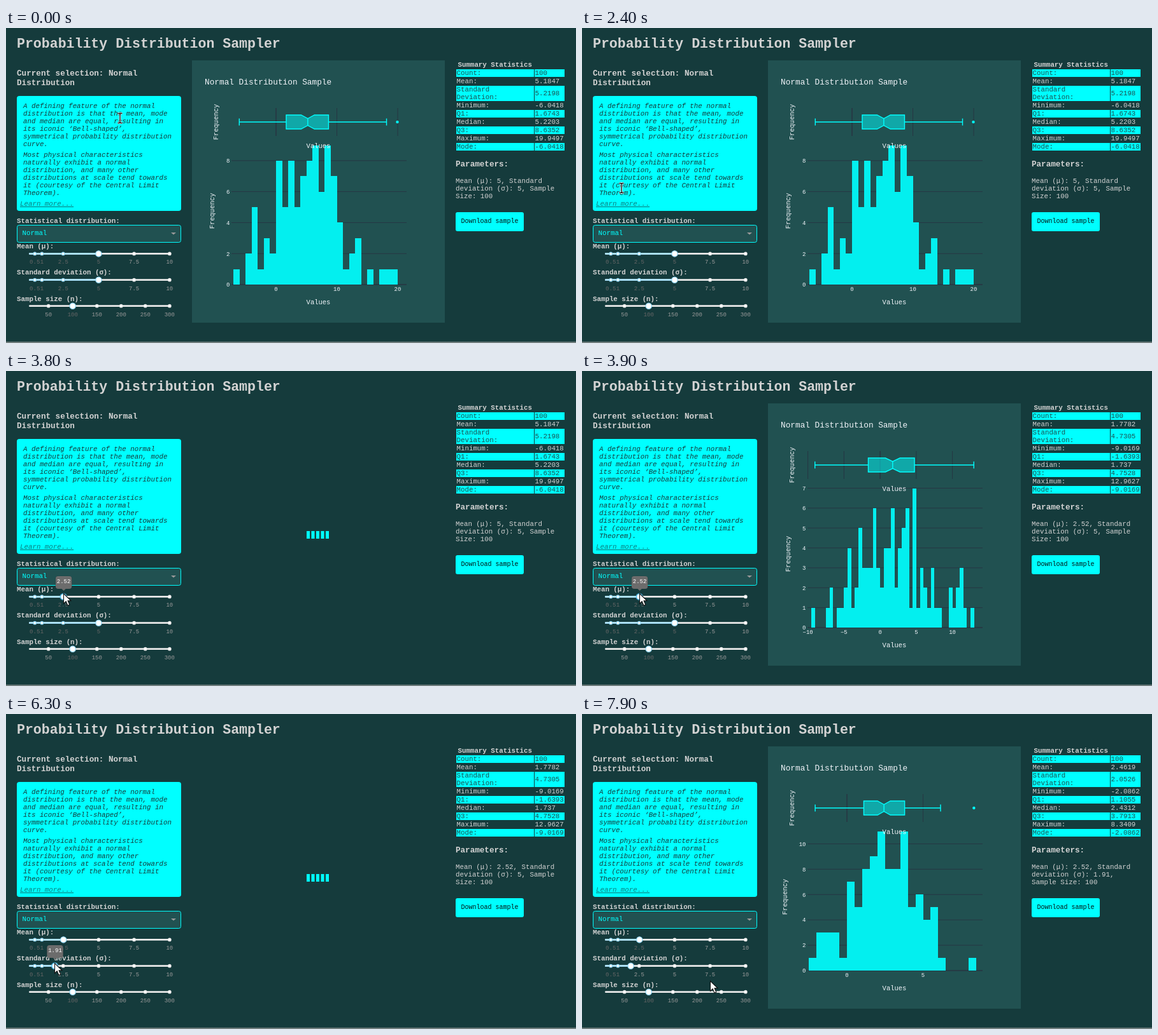
Animation, 895 px wide and 496 px high, one loop 8 s. Source, as an HTML page:

```html
<!DOCTYPE html>
<html lang="en">
<head>
<meta charset="utf-8">
<title>Probability Distribution Sampler</title>
<style>
  html, body { margin: 0; width: 100%; height: 100%; overflow: hidden; background: #153b3c; }
  svg { display: block; width: 895px; height: 496px; }
  text { font-family: "Liberation Mono", "Courier New", monospace; white-space: pre; }
</style>
</head>
<body>
<svg id="stage" viewBox="0 0 895 496" xmlns="http://www.w3.org/2000/svg">
  <defs>
    <linearGradient id="edge" x2="0" y2="1">
      <stop offset="0" stop-color="#3c5657"/>
      <stop offset=".6" stop-color="#7d8888"/>
      <stop offset="1" stop-color="#6a7677"/>
    </linearGradient>
  </defs>
  <g id="page"></g>
  <g id="results"></g>
  <g id="sliders"></g>
  <g id="tip"></g>
  <g id="pointer"></g>
</svg>
<script>
const LOOP = 8000;
const CYAN = '#00ffff', PAGE = '#153b3c', PANEL = '#215151', GREY = '#d3d3d3';
const INK = '#1b5253', BAR = '#03efef', GRID = '#283442', PALE = '#f2f5fa';
const BASE = 10.79;
const el = id => document.getElementById(id);

// Markup helpers
const text = (x, y, str, size, fill, extra = '') =>
  `<text x="${x}" y="${y}" font-size="${size}" fill="${fill}" ${extra}>${str}</text>`;
const rect = (x, y, w, h, fill, extra = '') =>
  `<rect x="${x}" y="${y}" width="${w}" height="${h}" fill="${fill}" ${extra}/>`;
const path = (d, stroke, width = 1, fill = 'none') =>
  `<path d="${d}" stroke="${stroke}" stroke-width="${width}" fill="${fill}"/>`;
const circle = (x, y, r, fill, extra = '') =>
  `<circle cx="${x}" cy="${y}" r="${r}" fill="${fill}" ${extra}/>`;
const lines = (x, y, list, step, ...style) =>
  list.map((s, i) => text(x, y + i * step, s, ...style)).join('');
const BOLD = 'font-weight="bold"', ITALIC = 'font-style="italic"';
const MIDDLE = 'text-anchor="middle"', END = 'text-anchor="end"';

const samples = [
  {
    mean: 5, sd: 5, zero: 424, unit: 9.55, start: -7, bin: 1, xTicks: [0, 10, 20], yStep: 2, labelX: 327,
    counts: [1, 0, 2, 5, 1, 3, 2, 8, 5, 8, 5, 7, 8, 9, 6, 9, 7, 4, 1, 2, 3, 0, 1, 0, 1, 1, 1],
    stats: ['5.1847', '5.2198', '-6.0418', '1.6743', '5.2203', '8.6352', '19.9497', '-6.0418'],
    whisker: 18.17,
    params: ['Mean (μ): 5, Standard', 'deviation (σ): 5, Sample', 'Size: 100']
  },
  {
    mean: 2.52, sd: 5, zero: 468.1, unit: 11.35, start: -9.5, bin: .5, xTicks: [-10, -5, 0, 5, 10], yStep: 1, labelX: 327,
    counts: [1, 0, 0, 0, 1, 2, 0, 1, 1, 2, 4, 1, 2, 5, 3, 3, 3, 6, 3, 2, 4, 4, 6, 2, 4, 5, 6,
      1, 7, 1, 3, 2, 1, 3, 1, 1, 0, 0, 2, 1, 2, 3, 1, 0, 1],
    stats: ['1.7782', '4.7305', '-9.0169', '-1.6393', '1.737', '4.7528', '12.9627', '-9.0169'],
    params: ['Mean (μ): 2.52, Standard', 'deviation (σ): 5, Sample', 'Size: 100']
  },
  {
    mean: 2.52, sd: 1.91, zero: 416, unit: 23.9, start: -2.5, bin: .5, xTicks: [0, 5], yStep: 2, labelX: 322,
    counts: [1, 3, 3, 3, 1, 7, 5, 8, 9, 11, 8, 8, 11, 5, 6, 4, 5, 1, 0, 0, 0, 1],
    stats: ['2.4619', '2.0526', '-2.0862', '1.1055', '2.4312', '3.7913', '8.3409', '-2.0862'],
    whisker: 6.15,
    params: ['Mean (μ): 2.52, Standard', 'deviation (σ): 1.91,', 'Sample Size: 100']
  }
];

function pageMarkup() {
  const label = (y, str) => text(17, y, str, BASE, GREY, BOLD);
  return rect(0, 0, 895, 496, PAGE) +
    rect(0, 493.5, 895, 2.5, 'url(#edge)') +
    text(17, 31, 'Probability Distribution Sampler', 21.56, GREY, BOLD) +
    lines(17, 75, ['Current selection: Normal', 'Distribution'], 15, 12.63, GREY, BOLD) +
    rect(17, 107, 258, 181, CYAN, 'rx="4"') +
    lines(27, 126, ['A defining feature of the normal', 'distribution is that the mean, mode',
      'and median are equal, resulting in', 'its iconic ‘Bell-shaped’,',
      'symmetrical probability distribution', 'curve.'], 12, BASE, PAGE, ITALIC) +
    lines(27, 203, ['Most physical characteristics', 'naturally exhibit a normal',
      'distribution, and many other', 'distributions at scale tend towards',
      'it (courtesy of the Central Limit', 'Theorem).'], 12, BASE, PAGE, ITALIC) +
    text(22, 280, 'Learn more...', BASE, '#0b7f80', ITALIC + ' text-decoration="underline"') +
    label(307, 'Statistical distribution:') +
    rect(17.5, 310.5, 257, 27, PANEL, `rx="3" stroke="${CYAN}"`) +
    text(25.5, 326, 'Normal', BASE, CYAN) +
    '<path d="M259 322h8l-4 3.6z" fill="#999"/>' +
    label(347, 'Mean (μ):') + label(388, 'Standard deviation (σ):') + label(430, 'Sample size (n):') +
    text(709.5, 61, 'Summary Statistics', BASE, GREY, BOLD) +
    text(706, 218, 'Parameters:', 12.6, GREY, BOLD) +
    rect(706, 290, 107, 30, CYAN, 'rx="3"') +
    text(714.5, 307, 'Download sample', 10, '#041414');
}

function boxMarkup(s, px) {
  const [low, q1, med, q3, max] = [2, 3, 4, 5, 6].map(i => +s.stats[i]);
  const high = s.whisker ?? max, mid = 148;
  const notch = 1.57 * (q3 - q1) / 10;
  const [a, b, m, n, o] = [q1, q3, med, med - notch, med + notch].map(px);
  const [l, h] = [low, high].map(px);
  return path(`M${l} ${mid}H${a}M${b} ${mid}H${h}M${l} 142.5v11M${h} 142.5v11`, CYAN, 1.4) +
    path(`M${a} 137H${n}L${m} 142.5L${o} 137H${b}V159H${o}L${m} 153.5L${n} 159H${a}ZM${m} 142.5v11`,
      CYAN, 1.4, 'rgba(0,255,255,.5)') +
    (s.whisker ? circle(px(max), mid, 2.2, CYAN) : '');
}

function chartMarkup(s) {
  const peak = Math.max(...s.counts), rise = 219.5 / peak;
  const px = v => +(s.zero + v * s.unit).toFixed(2);
  const py = n => +(404 - n * rise).toFixed(2);
  const yTicks = [];
  for (let n = 0; n <= peak; n += s.yStep) yTicks.push(n);
  const side = (x, y) =>
    text(0, 0, 'Frequency', 10.45, PALE, `${MIDDLE} transform="translate(${x} ${y}) rotate(-90)"`);
  const bars = s.counts.map((n, i) => {
    const x = px(s.start + i * s.bin);
    return n ? `M${x} 404V${py(n)}h${s.unit * s.bin}V404z` : '';
  }).join('');
  return rect(292, 51, 397, 413, PANEL) +
    s.xTicks.map(v => path(`M${px(v)} 126V170`, GRID, v ? .9 : 1.5)).join('') +
    yTicks.map(n => path(`M354 ${py(n)}H629`, GRID, n ? .9 : 1.5)).join('') +
    `<path d="${bars}" fill="${BAR}" shape-rendering="crispEdges"/>` +
    boxMarkup(s, px) +
    s.xTicks.map(v => text(px(v), 414, String(v).replace('-', '−'), 9, PALE, MIDDLE)).join('') +
    yTicks.map(n => text(351.5, py(n) + 3.3, n, 9, PALE, END)).join('') +
    text(312, 89, 'Normal Distribution Sample', 12.77, PALE) +
    text(490.5, 189, 'Values', 10.5, PALE, MIDDLE) +
    text(490.5, 435, 'Values', 10.5, PALE, MIDDLE) +
    side(333, 148) + side(s.labelX, 288);
}

function statsMarkup(s) {
  const names = ['Count:', 'Mean:', 'Standard|Deviation:', 'Minimum:', 'Q1:', 'Median:', 'Q3:', 'Maximum:', 'Mode:'];
  let y = 65;
  const rows = ['100', ...s.stats].map((value, i) => {
    const parts = names[i].split('|'), h = 12 * parts.length, lit = i % 2 === 0;
    const fill = lit ? INK : GREY;
    const row = (lit ? rect(707, y, 122, h, CYAN) + rect(830, y, 47, h, CYAN) : '') +
      lines(707.5, y + 9, parts, 12, BASE, fill) +
      text(830.5, y + 3 + h / 2, value, BASE, fill);
    y += h + 1;
    return row;
  });
  return rows.join('') + lines(706, 244, s.params, 12, BASE, GREY);
}

const loader = [0, 1, 2, 3, 4].map(i => rect(472 + i * 7.5, 252, 5, 12, CYAN)).join('');

const linear = (min, max) => v => +(36.3 + (v - min) / (max - min) * 220.5).toFixed(2);
const scale = linear(.1, 10), sizeScale = linear(10, 300);
const marks = [.5, 1, 2.5, 5, 7.5, 10], sizeMarks = [50, 100, 150, 200, 250, 300];

function slider(y, value, ticks, px, filled, held) {
  const x = px(value), isOn = v => filled ? v <= value : v === value;
  return rect(36, y - 1.4, 221, 2.8, '#e9e9e9', 'rx="1.4"') +
    (filled ? rect(36, y - 1.4, x - 36, 2.8, '#abe2fb', 'rx="1.4"') : '') +
    ticks.map(v => circle(px(v), y, 2.3, '#fff', `stroke="${isOn(v) ? '#96dbfa' : '#e9e9e9'}" stroke-width="1.2"`) +
      text(px(v), y + 16, v, 9, isOn(v) ? '#666' : '#999', MIDDLE)).join('') +
    (held ? circle(x, y, 6, '#57c5f7', 'opacity=".35"') : '') +
    circle(x, y, 4.6, '#fff', `stroke="${held ? '#57c5f7' : '#96dbfa'}" stroke-width="1.3"`);
}

function tooltip(x, y, value) {
  return rect(x - 13.5, y - .5, 27, 21, '#000', 'rx="5" opacity=".15"') +
    rect(x - 12.7, y, 25.4, 20, '#6c6c6c', 'rx="4"') +
    `<path d="M${x - 3.2} ${y + 20}h6.4l-3.2 3z" fill="#6c6c6c"/>` +
    text(x, y + 11.4, value, 9, '#fff', MIDDLE);
}

const beam = 'M-3.5 -7.5H-1Q0 -7.5 0 -6.5Q0 -7.5 1 -7.5H3.5M0 -6.5V6.5M-3.5 7.5H-1Q0 7.5 0 6.5Q0 7.5 1 7.5H3.5';
const cursors = {
  beam: path(beam, '#fff', 3) + path(beam, '#000', 1.3),
  arrow: path('M.5 .5V16.2L4.2 12.8L7 19.2L9.8 18L7.1 11.8H12Z', '#111', 1.1, '#fff')
};

// Pointer steps: time, x, y
const moves = [
  [0, 179, 142], [300, 166, 146], [400, 130, 156], [500, 86, 163], [600, 57, 161], [700, 49, 156],
  [1100, 49, 160], [1200, 51, 173], [1300, 54, 192], [1400, 58, 212], [1500, 61, 229], [1600, 62, 239],
  [2400, 62, 252], [2800, 132, 337],
  [3100, 127, 340], [3200, 111, 346], [3300, 96, 350], [3400, 89, 350], [3700, 90, 350],
  [5400, 96, 358], [5500, 90, 373], [5600, 79, 387], [5700, 76, 392], [7000, 76, 391],
  [7500, 88, 396], [7600, 117, 407], [7700, 155, 416], [7800, 187, 420], [7900, 201, 420]
];

// Interface steps: time, sample shown, loading, mean, deviation, held slider
const states = [
  [0, 0, false, 5, 5, ''],
  [3700, 0, false, 2.52, 5, 'mean'],
  [3800, 0, true, 2.52, 5, 'mean'],
  [3900, 1, false, 2.52, 5, 'mean'],
  [5400, 1, false, 2.52, 5, ''],
  [6300, 1, true, 2.52, 1.91, 'sd'],
  [6400, 2, false, 2.52, 1.91, 'sd'],
  [7500, 2, false, 2.52, 1.91, '']
];

const at = (table, t) => table.findLast(row => row[0] <= t);
let lastState, lastMove;

function showState([, index, loading, mean, sd, held]) {
  const s = samples[index];
  el('results').innerHTML = (loading ? loader : chartMarkup(s)) + statsMarkup(s);
  el('sliders').innerHTML =
    slider(355.4, mean, marks, scale, true, held === 'mean') +
    slider(396.7, sd, marks, scale, true, held === 'sd') +
    slider(437.7, 100, sizeMarks, sizeScale, false, false);
  el('tip').innerHTML =
    held === 'mean' ? tooltip(scale(mean) + .4, 323, mean) :
    held === 'sd' ? tooltip(scale(sd) + .4, 364, sd) : '';
}

function showPointer([time, x, y]) {
  el('pointer').innerHTML = cursors[time < 2800 ? 'beam' : 'arrow'];
  el('pointer').setAttribute('transform', `translate(${x} ${y})`);
}

function draw(now) {
  const t = Math.max(0, now - begin) % LOOP;
  const state = at(states, t), move = at(moves, t);
  if (state !== lastState) showState(lastState = state);
  if (move !== lastMove) showPointer(lastMove = move);
  requestAnimationFrame(draw);
}

el('page').innerHTML = pageMarkup();
const begin = performance.now();
draw(begin);
</script>
</body>
</html>
```
